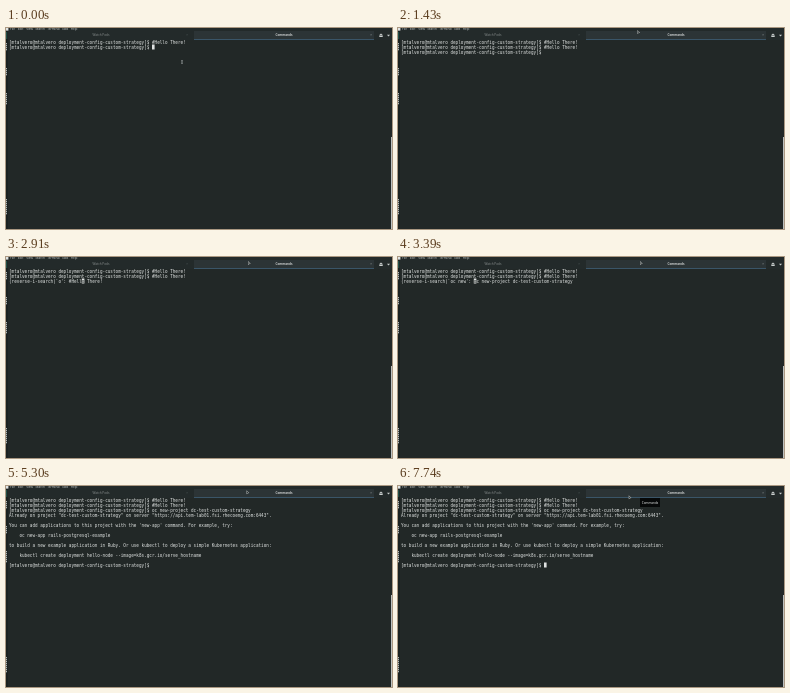
These frames come from a looping animation (386x201 px, 8 s). An HTML page with a canvas:

```html
<!DOCTYPE html>
<html lang="en">
<head>
<meta charset="utf-8">
<title>Terminal</title>
<style>
  html, body { margin: 0; width: 100%; height: 100%; overflow: hidden; background: #222827; }
  canvas { display: block; width: 386px; height: 201px; }
</style>
</head>
<body>
<canvas id="stage"></canvas>
<script>
const W = 386, H = 201, LOOP = 8000;
const CELL = 2.6, ROW = 5, LEFT = 3, TOP = 11.5;
const BG = '#222827', INK = '#dfe2e1';
const MONO = '"DejaVu Sans Mono", monospace', UI = '"Open Sans", sans-serif';

const canvas = document.getElementById('stage');
const ctx = canvas.getContext('2d');
const dpr = window.devicePixelRatio || 1;
canvas.width = W * dpr;
canvas.height = H * dpr;

const PROMPT = '[mtalvero@mtalvero deployment-config-custom-strategy]$ ';
const HELLO = '#Hello There!';
const PROJECT = 'dc-test-custom-strategy';
const CREATE = 'oc new-project ' + PROJECT;
const REMOVE = 'oc delete project ' + PROJECT;
const OUTPUT = [
  `Already on project "${PROJECT}" on server "https://api.tem-lab01.fsi.rhecoeng.com:6443".`,
  '',
  "You can add applications to this project with the 'new-app' command. For example, try:",
  '',
  '    oc new-app rails-postgresql-example',
  '',
  'to build a new example application in Ruby. Or use kubectl to deploy a simple Kubernetes application:',
  '',
  '    kubectl create deployment hello-node --image=k8s.gcr.io/serve_hostname',
  '',
  PROMPT
];

// Each track lists [start time, value]; the latest started value holds.
const SEARCH = [
  [2570, '', ''], [2910, 'o', HELLO, 5], [2970, 'oc', REMOVE], [3040, 'oc ', REMOVE],
  [3220, 'oc n', CREATE], [3300, 'oc ne', CREATE], [3390, 'oc new', CREATE]
];
const CURSOR = [
  [0, true], [1000, false], [1570, true], [2130, false], [2570, true], [4000, false],
  [4170, true], [4740, false], [5350, true], [5910, false], [6520, true], [7130, false], [7740, true]
];
const POINTER = [
  [0, 'beam', 176, 34], [130, ''], [1000, 'beam', 176, 34], [1070, 'beam', 203.5, 17.5],
  [1130, ''], [1430, 'arrow', 239.3, 2], [1570, 'arrow', 241.3, 3], [1700, 'arrow', 242, 4],
  [5220, 'arrow', 240.5, 4.3], [5350, 'arrow', 236, 6.5], [5570, 'arrow', 231, 9.6],
  [6220, 'arrow', 230.7, 9.3]
];
const TIP = [[0, 0], [2220, 254], [2610, 0], [6740, 242]];

const at = (track, t) => track.filter(step => step[0] <= t).pop();

function box(color, x, y, w, h) {
  ctx.fillStyle = color;
  ctx.fillRect(x, y, w, h);
}

// Text is set ten times larger and scaled down to keep fractional advances.
function text(str, x, y, size, family, color, align = 'left', weight = 400) {
  ctx.save();
  ctx.translate(x, y);
  ctx.scale(.1, .1);
  ctx.font = `${weight} ${size * 10}px ${family}`;
  ctx.textAlign = align;
  ctx.fillStyle = color;
  ctx.fillText(str, 0, 0);
  ctx.restore();
}

const label = (str, x, y, color, weight) => text(str, x, y, 3.1, UI, color, 'center', weight);

function mono(str, col, row, color = INK) {
  text(str, LEFT + col * CELL, TOP + row * ROW + 4, CELL / .602, MONO, color);
}

function shape(color, ...points) {
  ctx.fillStyle = color;
  ctx.beginPath();
  points.forEach(([x, y]) => ctx.lineTo(x, y));
  ctx.fill();
}

function drawWindow() {
  box(BG, 0, 0, W, H);
  box('#232a2a', 0, 0, W, 12);
  [['File', 6.5], ['Edit', 14.5], ['View', 23.5], ['Search', 34], ['Terminal', 47.5],
   ['Tabs', 59], ['Help', 68]].forEach(([name, x]) => label(name, x, 1.6, '#c3c8c7'));

  box('#2c3436', 188, 3, 180, 8);
  box('#3a5568', 188, 11, 180, 1);
  label('Watch Pods', 95, 8.4, '#8b9190');
  label('Commands', 278, 8.4, '#eef0f0', 600);
  text('×', 181, 8.4, 3, UI, '#555c5c', 'center');
  text('×', 365, 8.4, 3, UI, '#a3a9a9', 'center');
  shape('#c9cecd', [375, 5.4], [377, 7.3], [373, 7.3]);
  box('#c9cecd', 373.3, 7.6, 3.4, 1.4);
  shape('#c9cecd', [381, 6.8], [384, 6.8], [382.5, 8.6]);

  // Slivers of the window behind
  box('#1b2221', 0, 3, 2, H - 3);
  box('#e0e3e2', 0, 0, 2.4, 2.6);
  box('#235048', 0, 4, 1.2, 7);
  [[15, 8], [40, 8], [65, 12], [171, 15]].forEach(([y, h]) => {
    for (let d = 0; d < h; d += 2) box('#b4b9b8', 0, y + d, 1, 1.3);
  });
  box('#bcc0bf', 385, 109, 1, H - 109);
}

function screen(t) {
  const rows = [PROMPT + HELLO, PROMPT];
  if (t >= 130) rows[1] += HELLO;
  if (t >= 430) rows.push(PROMPT);
  let col = rows[rows.length - 1].length;
  if (t >= 4000) {
    rows[2] = PROMPT + CREATE;
    if (t >= 4170) rows.push('');
    if (t >= 5220) rows.splice(3, 1, ...OUTPUT);
    col = rows[rows.length - 1].length;
  } else if (t >= 2570) {
    const [, query, match, offset = 0] = at(SEARCH, t);
    const head = `(reverse-i-search)\`${query}': `;
    rows[2] = head + match;
    col = head.length + offset;
  }
  return { rows, col };
}

function drawPointer([, kind, x, y]) {
  if (kind === 'beam') {
    box('#a9aeae', x - .4, y - 1.9, .8, 3.8);
    box('#8b9190', x - .8, y - 2, 1.6, .5);
    box('#8b9190', x - .8, y + 1.5, 1.6, .5);
  } else if (kind) {
    shape('#a9aeae', [x, y], [x + 2.8, y + 2.8], [x + 1.6, y + 2.9], [x, y + 4]);
    shape('#141919', [x + .5, y + 1.1], [x + 1.9, y + 2.4], [x + 1.2, y + 2.5], [x + .5, y + 3]);
  }
}

function drawTip(x) {
  box('#060808', x, 12, 20, 9);
  label('Commands', x + 10, 17.5, '#f2f4f4');
}

function draw(t) {
  ctx.setTransform(dpr, 0, 0, dpr, 0, 0);
  drawWindow();
  const { rows, col } = screen(t);
  rows.forEach((line, row) => mono(line, 0, row));
  if (at(CURSOR, t)[1]) {
    const row = rows.length - 1;
    box(INK, LEFT + col * CELL, TOP + row * ROW, CELL, ROW);
    mono(rows[row][col] || '', col, row, BG);
  }
  const tip = at(TIP, t)[1];
  if (tip) drawTip(tip);
  drawPointer(at(POINTER, t));
}

const start = performance.now();
function tick() {
  draw((performance.now() - start) % LOOP);
  requestAnimationFrame(tick);
}
tick();
</script>
</body>
</html>
```
